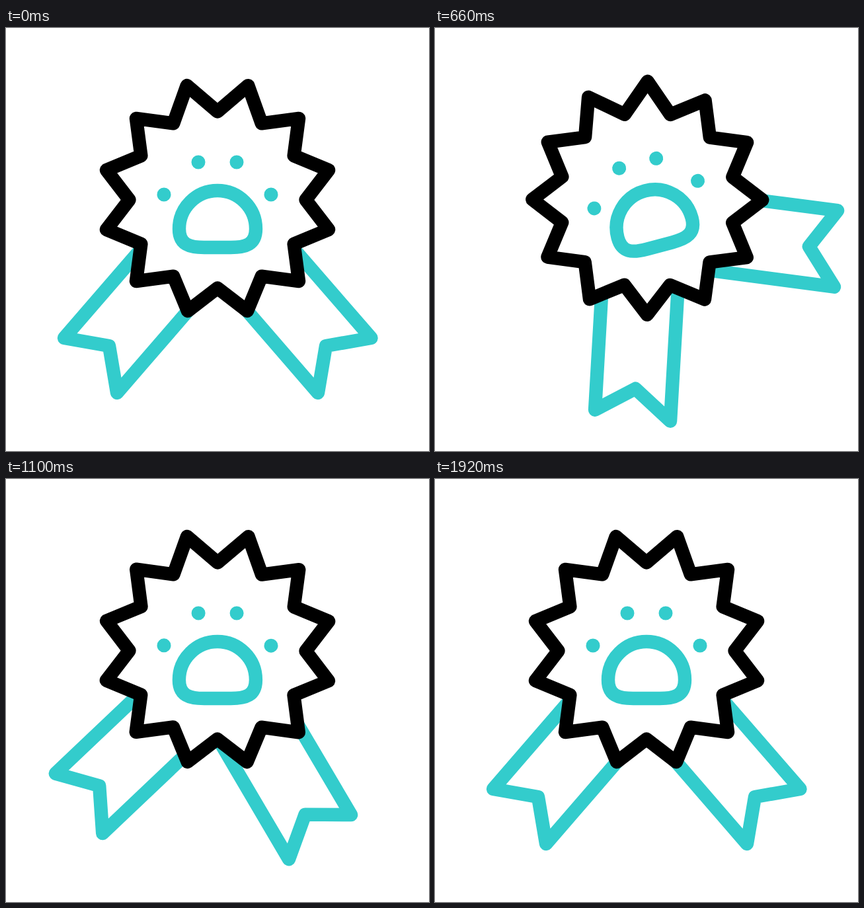
Animation, 640 px wide and 640 px high, one loop 2.4 s. Source, as an HTML page:

```html
<!DOCTYPE html>
<html lang="en">
<head>
<meta charset="utf-8">
<title>Paw rosette</title>
<style>
  html, body { margin: 0; height: 100%; overflow: hidden; background: #fff; }
  svg { display: block; width: 100vw; height: 100vh; }
  path { fill: none; stroke: #3cc; stroke-width: 20.4; stroke-linejoin: round; }
  circle { fill: #3cc; }
  #star { fill: #fff; stroke: #000; }
</style>
</head>
<body>
<svg viewBox="0 0 640 640">
  <g id="badge">
    <path id="left" d="M242 291 L88 469 L156 481 L168 552 L322 374"/>
    <path id="right" d="M398 291 L552.5 469 L484 481 L472 552 L318 374"/>
    <path id="star"/>
    <path d="M262 304 A58 58 0 0 1 378 304 C378 328 362 332 340 332 H300 C278 332 262 328 262 304 Z"/>
    <circle cx="291" cy="203" r="10.5"/>
    <circle cx="349" cy="203" r="10.5"/>
    <circle cx="239" cy="252" r="10.5"/>
    <circle cx="401" cy="252" r="10.5"/>
  </g>
</svg>
<script>
const LOOP = 2400;
// [time in ms, angle in degrees] at each turning point of the swing
const SWING = [[0, 0], [520, -27], [900, 13], [1230, -6.3], [1580, 3.2], [1800, 0]];
const el = id => document.getElementById(id);

// Twelve points; the two at the top reach slightly further out.
const points = [];
for (let i = 0; i < 24; i++) {
  const a = i * Math.PI / 12;
  const r = i % 2 === 0 ? 133.5 : i === 1 || i === 23 ? 179 : 174;
  points.push((320 + r * Math.sin(a)).toFixed(2) + ' ' + (260 - r * Math.cos(a)).toFixed(2));
}
el('star').setAttribute('d', 'M' + points.join('L') + 'Z');

function swing(t) {
  if (t <= 0) return 0;
  const i = SWING.findIndex(key => key[0] > t);
  if (i < 0) return 0;
  const [t0, a0] = SWING[i - 1], [t1, a1] = SWING[i];
  const ease = (1 - Math.cos(Math.PI * (t - t0) / (t1 - t0))) / 2;
  return a0 + (a1 - a0) * ease;
}

function turn(id, angle, x, y) {
  el(id).setAttribute('transform', `rotate(${angle} ${x} ${y})`);
}

// The ribbons repeat the badge's swing with a delay, on top of it.
function draw(now) {
  const t = now % LOOP;
  turn('badge', swing(t), 320, 255);
  turn('left', swing(t - 60), 319, 324);
  turn('right', swing(t - 120), 322, 322);
}

const start = performance.now();
function tick() {
  draw(performance.now() - start);
  requestAnimationFrame(tick);
}
tick();
</script>
</body>
</html>
```
